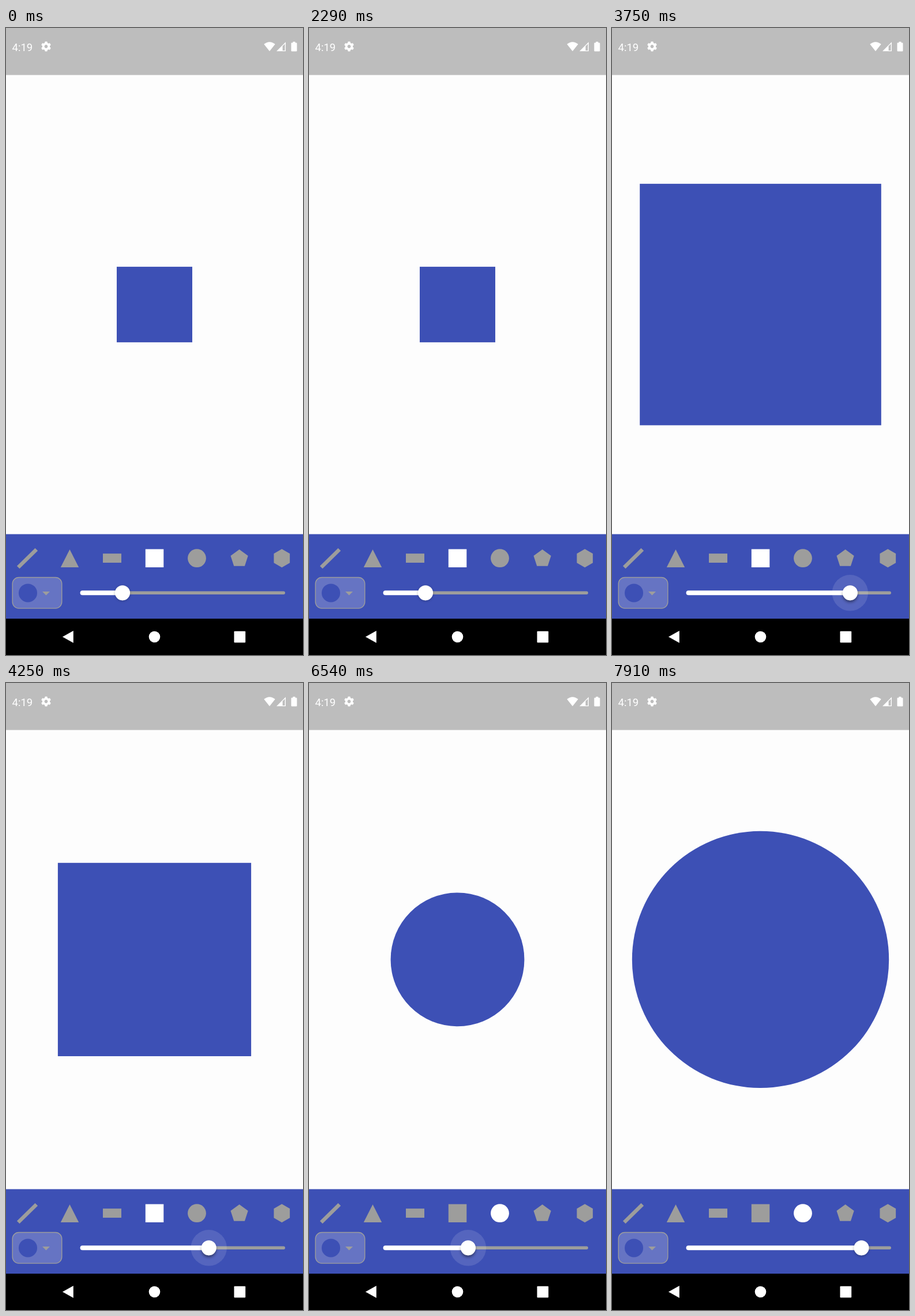
Recreate the animation shown at these times as an HTML page. Size 515x1087 px, loop 8000 ms.

```html
<!DOCTYPE html>
<html lang="en">
<head>
<meta charset="utf-8">
<title>Shape sizer</title>
<style>
  html, body { margin: 0; width: 100%; height: 100%; overflow: hidden; background: #fdfdfd; }
  svg { display: block; width: 515px; height: 1087px; }
  .blue { fill: #3d50b5; }
  .white { fill: #fff; }
  .tools { fill: #9d9d9c; }
  .tools .on { fill: #fff; }
  .clock { font: 18.5px Roboto, "Open Sans", sans-serif; }
</style>
</head>
<body>
<svg viewBox="0 0 515 1087">
  <defs>
    <filter id="soft" x="-60%" y="-60%" width="220%" height="220%">
      <feGaussianBlur stdDeviation="2.4"/>
    </filter>
  </defs>

  <rect width="515" height="1087" fill="#fdfdfd"/>
  <rect width="515" height="81.5" fill="#bdbdbd"/>

  <!-- status bar -->
  <g class="white">
    <text class="clock" x="10.5" y="39.5">4:19</text>
    <g id="gear" transform="translate(69.5 32)"></g>
    <path d="M457 40.3 L447.3 28 Q457 20.3 466.7 28 Z"/>
    <path d="M485 24.3 V40.3 H469 Z"/>
    <path d="M479.6 31.5 L483.6 27.5 V39 H479.6 Z" fill="#bdbdbd"/>
    <path d="M497.5 25.5 V23.8 H501.5 V25.5 H503.3 Q504.5 25.5 504.5 26.7 V39.3 Q504.5 40.5 503.3 40.5 H495.7 Q494.5 40.5 494.5 39.3 V26.7 Q494.5 25.5 495.7 25.5 Z"/>
  </g>

  <rect id="shape" class="blue"/>

  <rect class="blue" y="877.5" width="515" height="146.5"/>
  <g class="tools">
    <path d="M21.2 935 L52.8 904" stroke="#9d9d9c" stroke-width="6.6"/>
    <path d="M110.5 904 L126.2 935 H94.8 Z"/>
    <rect x="168" y="911.2" width="32" height="15.8"/>
    <rect id="squareTool" x="241.8" y="903.5" width="31.5" height="31.5"/>
    <circle id="circleTool" cx="331" cy="919.2" r="15.9"/>
    <polygon id="pentagon"/>
    <polygon id="hexagon"/>
  </g>

  <!-- colour picker -->
  <rect x="11.2" y="952.5" width="85.6" height="53.6" rx="11" fill="#6674c3" stroke="#9d9d9c" stroke-width="1.4"/>
  <circle class="blue" cx="38" cy="979.4" r="16"/>
  <path d="M63 976.9 H76 L69.5 983.4 Z" fill="#9d9d9c"/>

  <!-- slider -->
  <rect x="190" y="976.6" width="294" height="5.4" rx="2.7" fill="#9d9d9c"/>
  <rect id="track" class="white" x="128.6" y="975.3" height="8" rx="4"/>
  <circle id="halo" class="white" cy="979.3" opacity=".12"/>
  <circle id="shadow" r="12.5" filter="url(#soft)"/>
  <circle id="thumb" class="white" cy="979.3" r="13.1"/>

  <!-- navigation bar -->
  <rect y="1024" width="515" height="63"/>
  <g class="white">
    <path d="M98 1055.5 L116.8 1045 V1066 Z"/>
    <circle cx="257.5" cy="1055.5" r="9.8"/>
    <rect x="395.5" y="1045.7" width="19.7" height="19.7" rx="1"/>
  </g>
</svg>
<script>
const LOOP = 8000;
const SWITCH = 5410;
const CENTER = { x: 257.5, y: 479.4 };
// Slider thumb: time, x
const DRAG = [
  [2900, 202], [3560, 440], [3750, 413], [4230, 351.7],
  [6280, 351.7], [6540, 276.2], [6830, 205], [7700, 432.5]
];
// Finger down, finger up
const PRESSES = [[2880, 4280], [6250, 7760]];

const byId = id => document.getElementById(id);
const set = (el, attrs) => {
  for (const key in attrs) el.setAttribute(key, attrs[key]);
};
const clamp = v => Math.min(1, Math.max(0, v));

function polygon(id, sides, x, y, r) {
  const points = Array.from({ length: sides }, (_, i) => {
    const a = i * 2 * Math.PI / sides - Math.PI / 2;
    return (x + r * Math.cos(a)).toFixed(2) + "," + (y + r * Math.sin(a)).toFixed(2);
  });
  set(byId(id), { points: points.join(" ") });
}

function buildGear() {
  let parts = '<circle r="4.7" fill="none" stroke="#fff" stroke-width="3.6"/>';
  for (let i = 0; i < 6; i++) {
    parts += `<path d="M-2.8 -5 L-1.8 -8.5 H1.8 L2.8 -5 Z" transform="rotate(${i * 60})"/>`;
  }
  byId("gear").innerHTML = parts;
}

const slope = i => (DRAG[i + 1][1] - DRAG[i][1]) / (DRAG[i + 1][0] - DRAG[i][0]);

// Flat at turning points, smooth in between
function tangent(i) {
  if (i === 0 || i === DRAG.length - 1) return 0;
  const a = slope(i - 1), b = slope(i);
  return a * b <= 0 ? 0 : 2 * a * b / (a + b);
}

function thumbX(t) {
  const last = DRAG.length - 1;
  if (t <= DRAG[0][0]) return DRAG[0][1];
  if (t >= DRAG[last][0]) return DRAG[last][1];
  const i = DRAG.findIndex(key => key[0] > t) - 1;
  const [t0, x0] = DRAG[i], [t1, x1] = DRAG[i + 1];
  const d = t1 - t0, u = (t - t0) / d, v = 1 - u;
  return x0 * (1 + 2 * u) * v * v + x1 * u * u * (3 - 2 * u)
    + d * u * v * (tangent(i) * v - tangent(i + 1) * u);
}

const pressed = (t, fade) => Math.max(...PRESSES.map(([down, up]) =>
  Math.min(clamp((t - down) / 100), 1 - clamp((t - up) / fade))));

const shape = byId("shape"), track = byId("track"), thumb = byId("thumb");
const halo = byId("halo"), shadow = byId("shadow");

function draw(t) {
  const x = thumbX(t);
  const size = 131 + (x - 202) * 1.364;
  const round = t >= SWITCH;
  const lift = pressed(t, 200);

  set(shape, {
    x: CENTER.x - size / 2, y: CENTER.y - size / 2,
    width: size, height: size, rx: round ? size / 2 : 0
  });
  byId("squareTool").classList.toggle("on", !round);
  byId("circleTool").classList.toggle("on", round);

  set(track, { width: x - 128.6 });
  set(thumb, { cx: x });
  set(halo, { cx: x, r: 31.2 * pressed(t, 100) });
  set(shadow, { cx: x, cy: 980.3 + 2.5 * lift, opacity: 0.3 + 0.15 * lift });
}

function frame(now) {
  draw(now % LOOP);
  requestAnimationFrame(frame);
}

buildGear();
polygon("pentagon", 5, 404.6, 920, 15.9);
polygon("hexagon", 6, 478.3, 919.2, 16);
draw(0);
requestAnimationFrame(frame);
</script>
</body>
</html>
```
